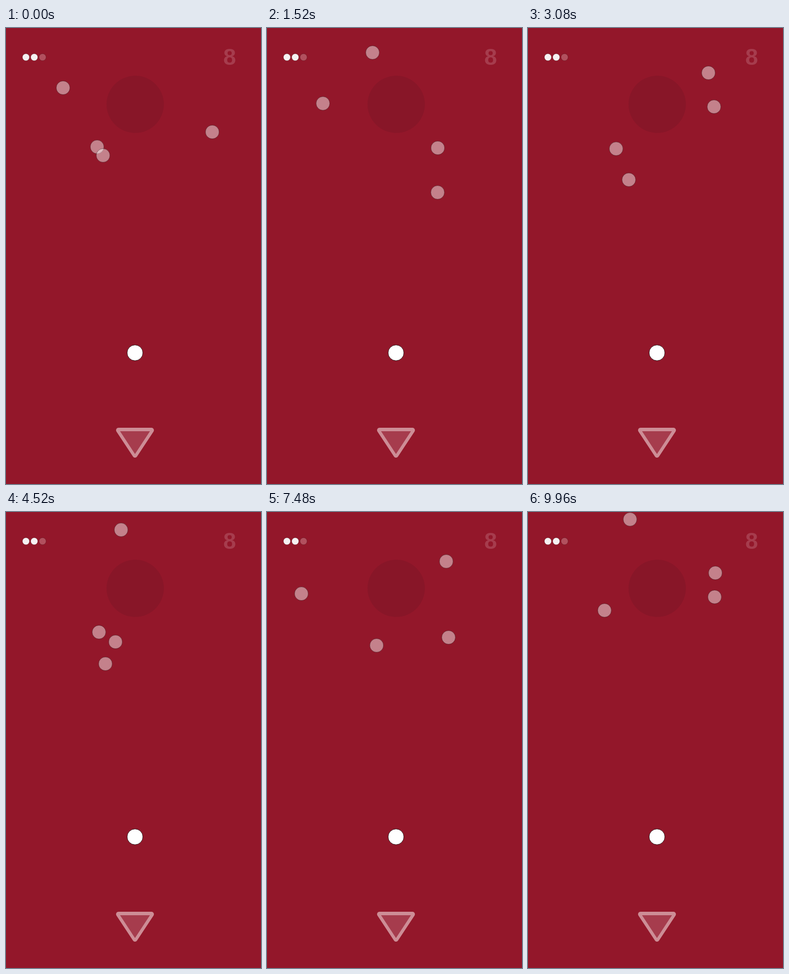
These frames come from a looping animation (512 by 916 pixels, 10000 ms). An HTML page:

```html
<!DOCTYPE html>
<html lang="en">
<head>
<meta charset="utf-8">
<title>Orbit game</title>
<style>
  html, body { margin: 0; width: 100%; height: 100%; overflow: hidden; background: #93172a; }
  svg { display: block; width: 512px; height: 916px; }
  .orb { fill: rgba(255, 255, 255, .46); stroke: rgba(20, 0, 4, .6); stroke-width: .7; }
  .life { fill: #f6f1f2; stroke: rgba(20, 0, 4, .35); stroke-width: .7; }
  .lost { fill: #b2505e; }
  .rim { fill: #cd8d96; stroke: #cd8d96; stroke-width: 10; stroke-linejoin: round; }
  text { font: bold 46px "Liberation Sans", Arial, sans-serif; fill: #a63c4d; text-anchor: middle; }
</style>
</head>
<body>
<svg viewBox="0 0 512 916">
  <rect width="512" height="916" fill="#93172a"/>
  <circle cx="259.4" cy="153.3" r="57.5" fill="#881628"/>
  <circle class="life" cx="40" cy="58.7" r="7"/>
  <circle class="life" cx="56.7" cy="58.7" r="7"/>
  <circle class="life lost" cx="73.4" cy="58.7" r="7"/>
  <text x="449" y="74">8</text>
  <path class="rim" d="M226 808H292L259 858Z"/>
  <path d="M229 810H289L259 855.8Z" fill="#a63c4d"/>
  <circle cx="259" cy="652.5" r="15.8" fill="#fff" stroke="#1a0005" stroke-width=".9"/>
  <g id="orbs"></g>
</svg>
<script>
  const LOOP = 10000, STEP = 40;
  const CENTER = { x: 259.2, y: 153.5 };

  // Each orb is a sum of rotating arms: [radius, start angle in deg, deg per second]
  const SPIN = [131.8, 74.85];
  const ORBS = [
    [[114.4, ...SPIN]],
    [[121, 122.1, -49.9]],
    [[138.3, 201.9, -19.95], [24.4, ...SPIN]],
    [[153.8, 34.2, 19.95], [-41.65, ...SPIN]]
  ];

  const group = document.getElementById("orbs");
  const dots = ORBS.map(() => {
    const dot = document.createElementNS("http://www.w3.org/2000/svg", "circle");
    dot.setAttribute("class", "orb");
    dot.setAttribute("r", 13.7);
    return group.appendChild(dot);
  });

  function draw(ms) {
    const sec = Math.floor((ms % LOOP) / STEP) * STEP / 1000;
    ORBS.forEach((arms, i) => {
      let { x, y } = CENTER;
      for (const [radius, start, speed] of arms) {
        const angle = (start + speed * sec) * Math.PI / 180;
        x += radius * Math.cos(angle);
        y += radius * Math.sin(angle);
      }
      dots[i].setAttribute("cx", x.toFixed(2));
      dots[i].setAttribute("cy", y.toFixed(2));
    });
  }

  const begin = performance.now();
  function tick() {
    draw(Math.max(0, performance.now() - begin));
    requestAnimationFrame(tick);
  }
  draw(0);
  requestAnimationFrame(tick);
</script>
</body>
</html>
```
